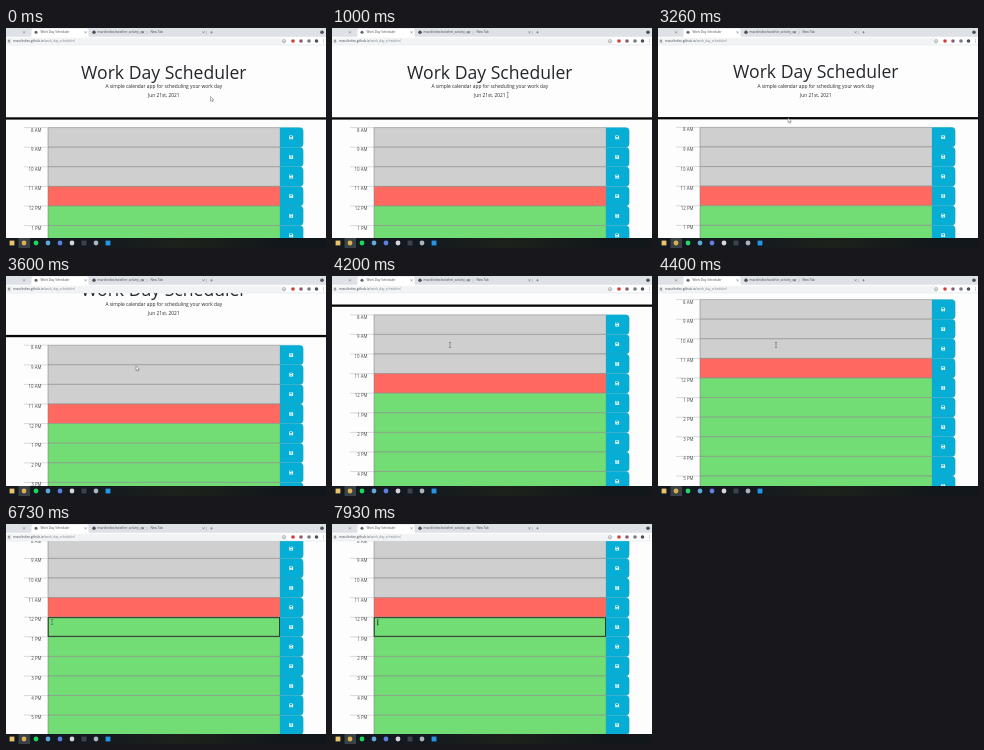
An HTML page that plays this animation: 320 px wide and 220 px high, repeating every 8000 ms.

```html
<!DOCTYPE html>
<html lang="en">
<head>
<meta charset="utf-8">
<title>Work Day Scheduler</title>
<style>
  html, body { margin: 0; width: 100%; height: 100%; overflow: hidden; background: #fff; }
  svg { display: block; }
  text { font-family: "Open Sans", sans-serif; fill: #24282c; }
  .mid { text-anchor: middle; }
  .title { font-size: 17.6px; }
  .lead { font-size: 4.85px; }
  .hour { font-size: 4.4px; text-anchor: end; fill: #45494d; }
  .ui { font-size: 3.1px; fill: #4a4e53; }
</style>
</head>
<body>
<svg width="320" height="220" viewBox="0 0 320 220">
  <defs>
    <clipPath id="view"><rect y="17" width="320" height="193"/></clipPath>
    <clipPath id="selClip"><rect id="selArea" y="64.2" height="6"/></clipPath>
    <linearGradient id="bar">
      <stop offset=".3" stop-color="#14191f"/>
      <stop offset=".55" stop-color="#1c221a"/>
      <stop offset=".85" stop-color="#12171b"/>
    </linearGradient>
    <g id="save">
      <path d="M-1.9-1.9h3l.8.8v3h-3.8z" fill="#f0fafd"/>
      <path d="M-1.200-1.400h2v.9h-2z" fill="#06a5cc"/>
      <circle cy=".8" r=".6" fill="#06a5cc"/>
    </g>
  </defs>

  <rect width="320" height="220" fill="#fdfdfd"/>
  <g clip-path="url(#view)">
    <g id="page">
      <text class="mid title" x="157.8" y="50.500">Work Day Scheduler</text>
      <text class="mid lead" x="157.8" y="60.300">A simple calendar app for scheduling your work day</text>
      <text class="mid lead" x="157.8" y="69">Jun 21st, 2021</text>
      <g clip-path="url(#selClip)">
        <rect x="141" y="64" width="34" height="7" fill="#2f88ea"/>
        <text class="mid lead" x="157.8" y="69" style="fill:#fff">Jun 21st, 2021</text>
      </g>
      <rect y="89.300" width="320" height="2.300" fill="#080808"/>
      <g id="rows"></g>
      <rect id="focus" x="42.200" y="178.500" width="231.300" height="18.600" fill="none" stroke="#1c2a1c" stroke-width=".9"/>
      <rect id="caret" x="45.200" y="180.900" width=".6" height="5.400" fill="#173517"/>
    </g>
  </g>

  <rect width="320" height="9" fill="#dee1e6"/>
  <path d="M24 9q1.500 0 1.500-1.500V2q0-1.500 1.500-1.500h54q1.500 0 1.500 1.500v5.500q0 1.500 1.500 1.500z" fill="#fff"/>
  <rect y="8.800" width="320" height="8.200" fill="#fff"/>
  <rect x="-4" y="9.800" width="285" height="6.200" rx="3.100" fill="#f1f3f4"/>
  <path d="M0 16.800h320" stroke="#d5d7da" stroke-width=".5"/>
  <path d="M141 2.500v4M200.500 2.500v4" stroke="#a3a7ad" stroke-width=".4"/>
  <g id="chrome"></g>
  <text class="ui" x="34.500" y="5.400">Work Day Scheduler</text>
  <text class="ui" x="91.500" y="5.400">mavolindeo/weather_activity_ap</text>
  <text class="ui" x="144.500" y="5.400">New Tab</text>
  <text class="ui" x="7" y="14.100">mavolindeo.github.io<tspan fill="#80868b">/work_day_scheduler/</tspan></text>

  <rect y="210" width="320" height="10" fill="url(#bar)"/>
  <rect x="12.500" y="210" width="11.500" height="10" fill="#3a4148"/>
  <g id="taskbar"></g>

  <g id="pointer">
    <path id="arrow" d="M0 0v4.600l1.100-1 .7 1.700.8-.35-.7-1.650h1.500z" fill="#fff" stroke="#444" stroke-width=".4"/>
    <path id="beam" d="M-1-2.500h2M0-2.500v5M-1 2.500h2" fill="none" stroke="#444" stroke-width=".45"/>
  </g>
</svg>
<script>
const $ = id => document.getElementById(id);
const set = (id, name, value) => $(id).setAttribute(name, value);
const show = (id, on) => set(id, 'visibility', on ? 'visible' : 'hidden');
const clamp = (v, lo, hi) => Math.min(hi, Math.max(lo, v));
const dot = (x, y, r, fill) => `<circle cx="${x}" cy="${y}" r="${r}" fill="${fill}"/>`;
const square = (x, y, r, fill) => `<rect x="${x - r}" y="${y - r}" width="${2 * r}" height="${2 * r}" fill="${fill}"/>`;
const glyph = (x, y, d) => `<path d="${d}" transform="translate(${x} ${y})" stroke="#5f6368" stroke-width=".5" fill="none"/>`;

const TOP = 99.6, ROW = 19.6, COUNT = 10;
const PAST = '#cfcfcf', NOW = '#ff695f', FUTURE = '#72dd74';

function row(i) {
  const hour = 8 + i, y = TOP + i * ROW;
  const label = `${hour > 12 ? hour - 12 : hour} ${hour < 12 ? 'AM' : 'PM'}`;
  const fill = hour < 11 ? PAST : hour === 11 ? NOW : FUTURE;
  return `<rect x="42" y="${y}" width="232" height="${ROW}" fill="${fill}"/>
    <path d="M18 ${y}h24" stroke="#b5b5b5" stroke-width=".5"/>
    <path d="M42 ${y}h232M42 ${y + ROW}h232" stroke="#8a8d8a" stroke-width=".6"/>
    <path d="M42 ${y}v${ROW}" stroke="#777" stroke-width=".5"/>
    <path d="M274 ${y}h19.700q3.500 0 3.500 3.500v${ROW - 7}q0 3.500-3.500 3.500h-19.700z" fill="#06aed5" stroke="#3c9fb8" stroke-width=".3"/>
    <text class="hour" x="35.500" y="${y + 4}">${label}</text>
    <use href="#save" x="285.200" y="${y + ROW / 2}"/>`;
}
$('rows').innerHTML = Array.from({ length: COUNT }, (_, i) => row(i)).join('');

const CROSS = 'M-1-1l2 2M1-1l-2 2', PLUS = 'M-1.300 0h2.600M0-1.300v2.600';
const LOCK = 'M-.8-.3h1.600v1.500h-1.600zM-.5-.3v-.8h1v.8';
const STAR = 'M0-1.500l1.500 1.200-.6 1.700h-1.800l-.6-1.700z';
$('chrome').innerHTML =
  [18, 79.5, 137, 197.5].map(x => glyph(x, 4.3, CROSS)).join('') + glyph(205.5, 4.3, PLUS) +
  dot(30, 4.3, 1.5, '#5f6368') + dot(88, 4.3, 1.7, '#4a4e53') + dot(316, 4.3, 1.8, '#4a4e53') +
  glyph(3, 13, LOCK) + glyph(278, 13, STAR) +
  [[287, '#d63a35'], [295, '#8c5a70'], [303, '#767b80'], [310.5, '#4b5056']]
    .map(([x, c]) => dot(x, 13, 1.8, c)).join('') +
  [11.8, 13, 14.2].map(y => dot(317.5, y, .4, '#5f6368')).join('');

const apps = [
  [square, '#e9c46a'], [dot, '#d9b24c'], [dot, '#1ed760'], [dot, '#5fa9d6'], [dot, '#5f7fe0'],
  [dot, '#d8d5dc'], [square, '#3d4449'], [dot, '#aab4bd'], [square, '#2496e8']
];
$('taskbar').innerHTML = apps.map(([shape, c], i) => shape(6 + i * 12, 215, 2.4, c)).join('');

// Pointer path: time, x, y
const path = [
  [0, 204.5, 68.5], [200, 204.5, 68.5], [950, 176, 67], [1100, 175, 67], [1850, 135, 71], [2060, 132.5, 73],
  [2700, 132.5, 73], [3200, 130, 90], [3600, 130, 90], [3900, 118, 69], [4500, 118, 69], [4900, 46, 98], [8000, 46, 98]
];
const wheel = [3250, 3420, 3760, 3960, 4240, 4560];
const WHEEL_STEP = 15.2, MAX_SCROLL = 84.8;
const DATE_LEFT = 141.5, DATE_RIGHT = 174;
const smooth = u => u * u * (3 - 2 * u);

function pointerAt(t) {
  const i = path.findIndex(p => p[0] > t), a = path[i - 1], b = path[i];
  const u = smooth((t - a[0]) / (b[0] - a[0]));
  return [a[1] + (b[1] - a[1]) * u, a[2] + (b[2] - a[2]) * u];
}

function draw(t) {
  const [x, y] = pointerAt(t);
  const scroll = wheel.reduce((sum, start) => sum + WHEEL_STEP * smooth(clamp((t - start) / 150, 0, 1)), 0);
  set('page', 'transform', `translate(0 ${-Math.min(MAX_SCROLL, scroll)})`);

  const left = t > 1100 && t < 2750 ? clamp(x, DATE_LEFT, DATE_RIGHT) : DATE_RIGHT;
  set('selArea', 'x', left);
  set('selArea', 'width', DATE_RIGHT - left);

  const beam = t > 3650 || (t > 900 && t < 1800);
  set('pointer', 'transform', `translate(${x} ${y})`);
  show('arrow', !beam);
  show('beam', beam);

  const focused = t >= 4930;
  show('focus', focused);
  show('caret', focused && (t - 4930) % 1000 < 500);
}

function tick() {
  draw(performance.now() % 8000);
  requestAnimationFrame(tick);
}
tick();
</script>
</body>
</html>
```
